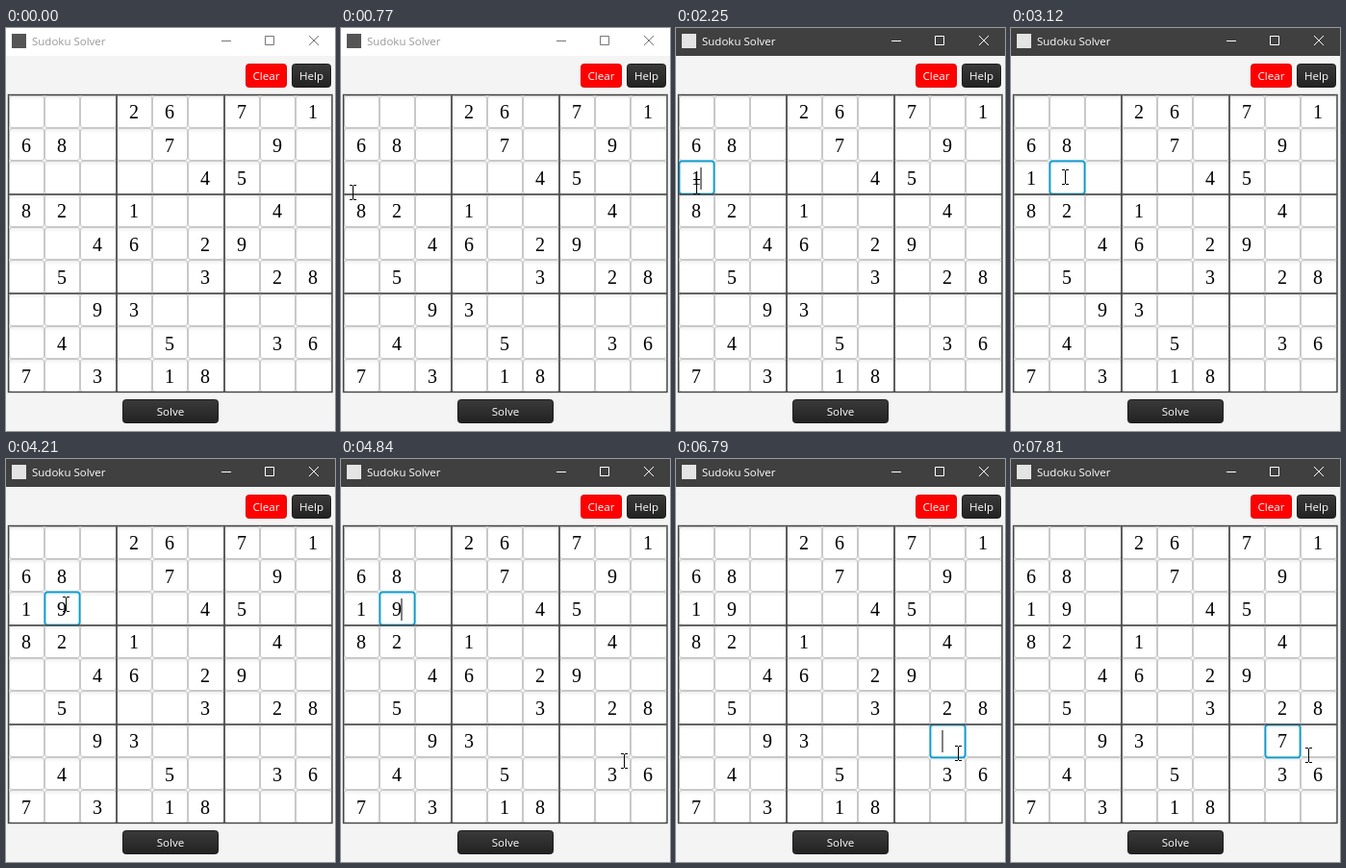
Write an HTML page that moves like this. It is 342 px wide and 419 px high and loops after 8 s.

```html
<!DOCTYPE html>
<html lang="en">
<head>
<meta charset="utf-8">
<title>Sudoku Solver</title>
<style>
  html, body { margin: 0; width: 100%; height: 100%; overflow: hidden; background: #f4f4f4; }
  svg { display: block; width: 342px; height: 419px; }
  .ui { font: 11.6px "Open Sans", "Noto Sans", sans-serif; }
  .digit { font: 20px "Liberation Serif", "Times New Roman", serif; text-anchor: middle; }
  .label { fill: #fff; text-anchor: middle; }
</style>
</head>
<body>
<svg id="stage" viewBox="0 0 342 419">
  <defs>
    <linearGradient id="dark" x1="0" y1="0" x2="0" y2="1">
      <stop offset="0" stop-color="#3a3a3a"/><stop offset="1" stop-color="#222"/>
    </linearGradient>
    <linearGradient id="field" x1="0" y1="0" x2="0" y2="1">
      <stop offset="0" stop-color="#efefef"/><stop offset=".15" stop-color="#fff"/>
    </linearGradient>
  </defs>
  <rect width="342" height="419" fill="#f4f4f4"/>
  <rect id="bar" width="342" height="29"/>
  <rect id="icon" x="6" y="6" width="15" height="15"/>
  <text id="title" class="ui" x="27" y="18" style="font-size:11.5px">Sudoku Solver</text>
  <path id="controls" d="M224 13.5h10M269.5 8.5h9v9h-9zM315 8l10 10M325 8l-10 10" fill="none"/>
  <g id="buttons"></g>
  <g id="cells"></g>
  <g id="ring" fill="none" stroke="#039ed3">
    <rect width="36" height="34" rx="3" stroke-width="3.5" opacity=".15"/>
    <rect width="36" height="34" rx="2.5" stroke-width="1.5"/>
  </g>
  <path d="M115 70V379M227 70V379M3 173H339M3 276H339" stroke="#444" stroke-width="1.6"/>
  <rect x="2.5" y="69.5" width="336.5" height="309" fill="none" stroke="#444" stroke-width="1.4"/>
  <g id="digits"></g>
  <path id="caret" d="M0 0V23" stroke="#000"/>
  <circle id="halo" r="11" fill="#f6ee20" opacity=".65"/>
  <path id="arrow" d="M.5 .5V16L4 12.7L6.4 18.3L8.7 17.3L6.4 11.8H11.3Z" fill="#fff" stroke="#000" stroke-width=".9"/>
  <path id="beam" d="M-3.5 -7.5H-.5M.5 -7.5H3.5M0 -7V7M-3.5 7.5H-.5M.5 7.5H3.5" stroke="#000"/>
</svg>
<script>
const LOOP = 8000, STEP = 80;
const $ = id => document.getElementById(id);

function add(parent, tag, attrs, text = "") {
  const el = document.createElementNS("http://www.w3.org/2000/svg", tag);
  for (const key in attrs) el.setAttribute(key, attrs[key]);
  el.textContent = text;
  parent.append(el);
  return el;
}
const show = (el, on) => el.setAttribute("visibility", on ? "visible" : "hidden");
const place = (el, x, y) => el.setAttribute("transform", `translate(${x} ${y})`);

const colX = c => Math.round(2.5 + 37.35 * c);
const rowY = r => Math.round(69.5 + 34.35 * r);
const midX = c => Math.round(20.8 + 37.3 * c);
const baseY = r => Math.round(94.4 + 34.3 * r);
const digit = (r, c, value) =>
  add($("digits"), "text", { class: "digit", x: midX(c), y: baseY(r) }, value);

function button(x, y, width, label, fill, stroke) {
  add($("buttons"), "rect", { x: x + .5, y: y + .5, width: width - 1, height: 24, rx: 3, fill, stroke });
  add($("buttons"), "text", { class: "ui label", x: x + width / 2, y: y + 17 }, label);
}
button(249, 37, 43, "Clear", "#f00", "#e00000");
button(297, 37, 41, "Help", "url(#dark)", "#1c1c1c");
button(121, 386, 100, "Solve", "url(#dark)", "#1c1c1c");

const puzzle = [
  "...26.7.1", "68..7..9.", ".....45..",
  "82.1...4.", "..46.29..", ".5...3.28",
  "..93.....", ".4..5..36", "7.3.18..."
];
puzzle.forEach((line, r) => [...line].forEach((value, c) => {
  add($("cells"), "rect", {
    x: colX(c) + .5, y: rowY(r) + .5, rx: 2.5,
    width: colX(c + 1) - colX(c) - 1, height: rowY(r + 1) - rowY(r) - 1,
    fill: "url(#field)", stroke: "#c8c8c8"
  });
  if (value !== ".") digit(r, c, value);
}));

// Clicked cells: focus time, release time, typing time, pointer spot, and caret intervals.
const entries = [
  { row: 2, col: 0, press: 1000, release: 1090, typed: 1940, value: 1, spot: [11.5, 171],
    blinks: [[1090, 1550], [1940, 2410]] },
  { row: 2, col: 1, press: 2570, release: 2650, typed: 3750, value: 9, spot: [56, 155],
    blinks: [[2650, 3120], [3670, 4210], [4680, 5230]] },
  { row: 6, col: 7, press: 5710, release: 5780, typed: 7020, value: 7, spot: [290.5, 305],
    blinks: [[5780, 6320], [6790, 7570]] }
];
for (const e of entries) e.text = digit(e.row, e.col, e.value);

// Pointer moves: start, end, from, to.
const moves = [
  [290, 770, [274, 385], [12.5, 171]],
  [2250, 2490, [21.5, 165], [56.5, 155]],
  [4210, 4680, [62.5, 151], [294.5, 315]],
  [4840, 4840, [294.5, 314], [294.5, 314]],
  [5230, 5710, [294.5, 313], [290.5, 305]],
  [5780, 5780, [293.5, 306], [293.5, 306]],
  [7730, 7810, [297.5, 306], [309.5, 308]]
];

function pointer(t) {
  const move = moves.filter(m => t >= m[0]).pop();
  if (!move) return null;
  const [start, end, from, to] = move;
  const p = t >= end ? 1 : Math.floor((t - start) / STEP) * STEP / (end - start);
  const k = p * p * (3 - 2 * p);
  const x = from[0] + (to[0] - from[0]) * k;
  const y = from[1] + (to[1] - from[1]) * k;
  return [Math.floor(x) + .5, Math.round(y)];
}

function paintWindow(active) {
  const ink = active ? "#fff" : "#777";
  $("bar").setAttribute("fill", active ? "#404040" : "#fff");
  $("icon").setAttribute("fill", active ? "#e4e4e4" : "#555");
  $("title").setAttribute("fill", active ? "#fff" : "#999");
  $("controls").setAttribute("stroke", ink);
}

function render(t) {
  paintWindow(t >= entries[0].press);
  for (const e of entries) show(e.text, t >= e.typed);

  const focus = entries.filter(e => t >= e.press).pop();
  show($("ring"), focus);
  show($("halo"), focus && t < focus.release);
  show($("caret"), focus && focus.blinks.some(([on, off]) => t >= on && t < off));
  if (focus) {
    place($("ring"), colX(focus.col) + .5, rowY(focus.row) + .5);
    place($("halo"), ...focus.spot);
    place($("caret"), midX(focus.col) + (t >= focus.typed ? 5 : -5), baseY(focus.row) - 18);
  }

  const at = pointer(t);
  const onPanel = at && at[1] > 379;
  show($("arrow"), onPanel);
  show($("beam"), at && !onPanel);
  if (onPanel) place($("arrow"), Math.floor(at[0]), at[1]);
  else if (at) place($("beam"), ...at);
}

const origin = performance.now();
function tick() {
  render((performance.now() - origin) % LOOP);
  requestAnimationFrame(tick);
}
tick();
</script>
</body>
</html>
```
